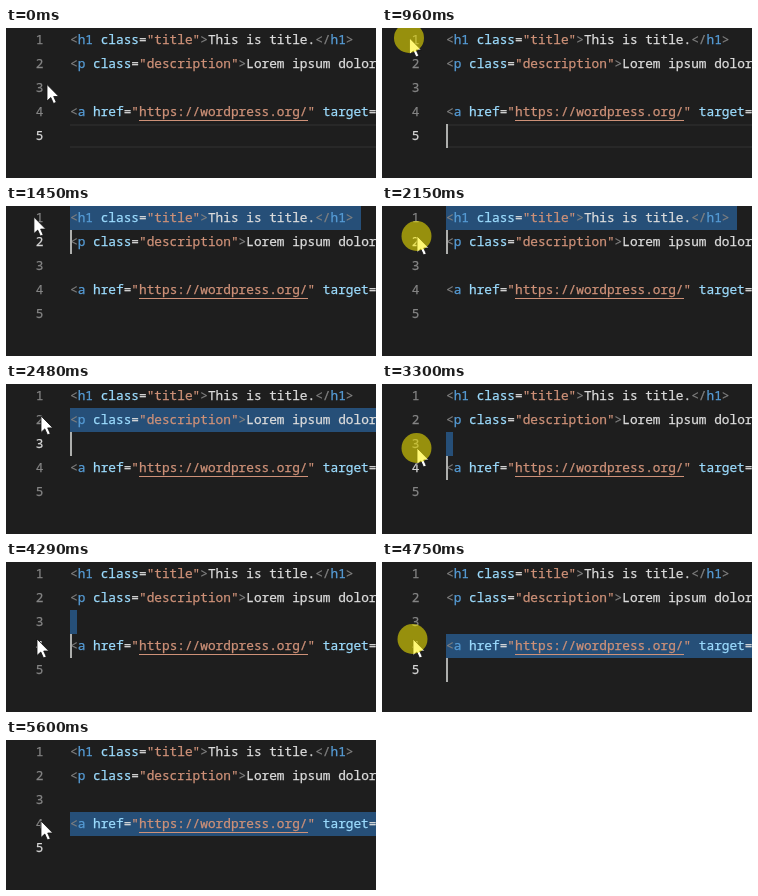
Animation of 370x150 px, one loop 5.63 s. Source, as an HTML page:

```html
<!DOCTYPE html>
<html lang="en">
<head>
<meta charset="utf-8">
<title>Selecting lines by number</title>
<style>
  html, body { margin: 0; width: 100%; height: 100%; overflow: hidden; background: #1e1e1e; }
  svg { display: block; width: 370px; height: 150px; }
  text { font: 12.78px "Noto Sans Mono", "DejaVu Sans Mono", monospace; white-space: pre; color: #dcdcdc; }
  text, tspan { fill: currentColor; stroke: currentColor; stroke-width: .25px; }
  .num { text-anchor: end; color: #858585; }
  .num.on { color: #d6d6d6; }
  .p { color: #808080; }
  .t { color: #569cd6; }
  .a { color: #9cdcfe; }
  .s { color: #ce9178; }
</style>
</head>
<body>
<svg viewBox="0 0 370 150">
  <rect width="370" height="150" fill="#1e1e1e"/>
  <path id="current" d="M64 97H370M64 119H370" stroke="#282828" stroke-width="2"/>
  <rect id="selection" x="64" height="24" fill="#264f78"/>
  <g id="code"></g>
  <path d="M133 92.5H302" stroke="#ce9178"/>
  <rect id="caret" x="64" width="2" height="24" fill="#aeafad"/>
  <path id="mouse" d="M0 0V16.5L3.8 13L6.5 19L9.3 17.8L6.7 12H11.8Z" fill="#fff" stroke="#111" stroke-width=".8"/>
  <circle id="click" r="15" fill="#fff200" fill-opacity=".54"/>
</svg>
<script>
const LOOP = 5630, ROW = 24, LEFT = 64, CHAR = 7.67;
const SVG = "http://www.w3.org/2000/svg";
const $ = id => document.getElementById(id);

// Each token is [class, text]
const lines = [
  [["p", "<"], ["t", "h1"], ["a", " class"], ["", "="], ["s", '"title"'], ["p", ">"],
   ["", "This is title."], ["p", "</"], ["t", "h1"], ["p", ">"]],
  [["p", "<"], ["t", "p"], ["a", " class"], ["", "="], ["s", '"description"'], ["p", ">"],
   ["", "Lorem ipsum dolor"]],
  [],
  [["p", "<"], ["t", "a"], ["a", " href"], ["", "="], ["s", '"https://wordpress.org/"'],
   ["a", " target"], ["", "="]],
  []
];

// Pointer moves: start, end, steps, destination
const home = [41, 56.5];
const moves = [
  [30, 220, 6, [27.5, 10]],
  [1450, 1740, 7, [35, 30]],
  [2480, 2720, 7, [35, 64]],
  [3770, 3910, 4, [31, 75]],
  [4080, 4080, 1, [31, 77]],
  [5600, 5600, 1, [35, 81]]
];
// Clicks: press, selection, release
const clicks = [[960, 1030, 1090], [2150, 2180, 2280], [3170, 3300, 3420], [4750, 4750, 4860]];
const caretOn = [[960, 1520], [1990, 2680], [3170, 3790], [4290, 5240]];

function addText(x, row, cls, parent) {
  const el = document.createElementNS(SVG, "text");
  el.setAttribute("x", x);
  el.setAttribute("y", row * ROW + 16);
  el.setAttribute("class", cls);
  return parent.appendChild(el);
}

const numbers = lines.map((tokens, row) => {
  const num = addText(37.5, row, "num", $("code"));
  num.textContent = row + 1;
  const line = addText(LEFT, row, "", $("code"));
  for (const [cls, text] of tokens) {
    const span = document.createElementNS(SVG, "tspan");
    span.setAttribute("class", cls);
    span.textContent = text;
    line.appendChild(span);
  }
  return num;
});
const lengths = lines.map(tokens => tokens.reduce((n, [, text]) => n + text.length, 0));

const ease = u => u * u * (3 - 2 * u);
const show = (id, on) => $(id).setAttribute("visibility", on ? "visible" : "hidden");

function pointerAt(t) {
  let pos = home;
  for (const [start, end, steps, to] of moves) {
    if (t < start) break;
    const gap = (end - start) / Math.max(1, steps - 1);
    const step = t >= end ? steps : Math.floor((t - start) / gap) + 1;
    const u = ease(step / steps);
    pos = pos.map((v, i) => v + (to[i] - v) * u);
  }
  return pos;
}

function draw(t) {
  const [x, y] = pointerAt(t);
  $("mouse").setAttribute("transform", `translate(${x} ${y})`);
  $("click").setAttribute("cx", x - .5);
  $("click").setAttribute("cy", y);
  show("click", clicks.some(([down, , up]) => t >= down && t < up));

  const picked = clicks.filter(c => t >= c[1]).length - 1;
  const active = picked < 0 ? 4 : picked + 1;
  show("current", picked < 0);
  show("selection", picked >= 0);
  if (picked >= 0) {
    $("selection").setAttribute("y", picked * ROW);
    $("selection").setAttribute("width", Math.floor((lengths[picked] + 1) * CHAR));
  }
  numbers.forEach((el, i) => el.classList.toggle("on", i === active));
  $("caret").setAttribute("y", active * ROW);
  show("caret", caretOn.some(([on, off]) => t >= on && t < off));
}

const begin = performance.now();
function frame() {
  draw((performance.now() - begin) % LOOP);
  requestAnimationFrame(frame);
}
frame();
</script>
</body>
</html>
```
